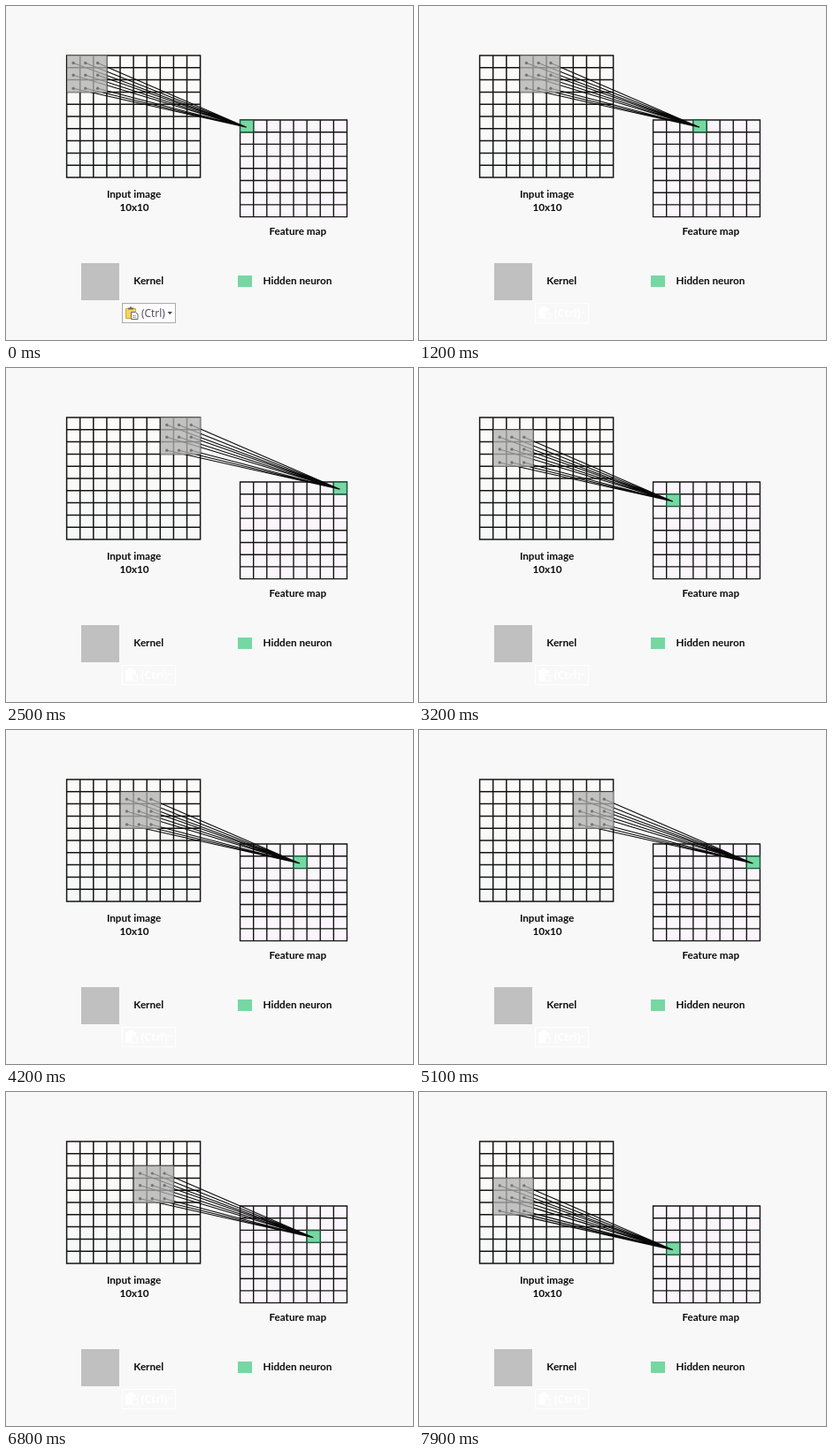
These frames come from a looping animation (460x378 px, 8000 ms). An HTML page:

```html
<!DOCTYPE html>
<html lang="en">
<head>
<meta charset="utf-8">
<title>Convolution kernel</title>
<style>
  html, body { margin: 0; width: 100%; height: 100%; overflow: hidden; background: #f8f8f8; }
  svg { display: block; width: 460px; height: 378px; }
  .label { font: 700 11.7px Lato, "Open Sans", sans-serif; fill: #0c0c0c; }
  .hint { font: 12px "Open Sans", "Noto Sans", sans-serif; fill: #51455a; }
  .ghost .hint { font-weight: 700; fill: #fff; }
</style>
</head>
<body>
<svg viewBox="0 0 460 378">
  <defs>
    <linearGradient id="paper" x1="0" y1="0" x2="0" y2="1">
      <stop offset="0" stop-color="#fdfbf9"/>
      <stop offset="1" stop-color="#f6f8f8"/>
    </linearGradient>
  </defs>
  <rect width="460" height="378" fill="#f8f8f8"/>
  <rect x="68.7" y="56" width="151" height="138" fill="url(#paper)"/>
  <rect x="264.7" y="129" width="120.6" height="110" fill="#fbf6fb"/>
  <path id="inputGrid" fill="none" stroke="#141414" stroke-width="1.5"/>
  <path id="mapGrid" fill="none" stroke="#141414" stroke-width="1.4"/>

  <rect id="neuron" width="15.1" height="13.8" fill="#76d7a3" stroke="#1c5c3d" stroke-width="1.4"/>
  <path id="rays" fill="none" stroke="#080808" stroke-width="1.1"/>
  <rect id="kernel" width="45.3" height="42.2" fill="#b0b0b0" fill-opacity=".76"/>
  <g id="dots" fill="#757575"></g>

  <g class="label" text-anchor="middle">
    <text x="144.6" y="217">Input image</text>
    <text x="145" y="232">10x10</text>
    <text x="329.8" y="259">Feature map</text>
  </g>
  <rect x="85" y="291" width="43" height="42" fill="#c0c0c0"/>
  <text class="label" x="144.3" y="315">Kernel</text>
  <rect x="262" y="305" width="16" height="13" fill="#76d7a3"/>
  <text class="label" x="290.6" y="315">Hidden neuron</text>

  <g id="button">
    <rect x="131.5" y="336.5" width="60" height="22" fill="#fdfdfd" stroke="#ababab"/>
    <path d="M135.5 342.5h11v11h-11z" fill="#f5d35e" stroke="#d9a92c"/>
    <path d="M138 343.5v-2h1.7q1.3-3 2.6 0h1.7v2z" fill="#6a6a6a"/>
    <path d="M141.5 346.5h5l2.5 2.5v5.500h-7.500z" fill="#fff" stroke="#6a6a6a"/>
    <path d="M143 350.500h4M143 352.500h4" stroke="#8a8a8a" stroke-width=".8"/>
    <text class="hint" x="153" y="352" textLength="">(Ctrl)</text>
    <path d="M182.500 346h5.500l-2.750 3.200z" fill="#51455a"/>
  </g>
  <g id="ghost" class="ghost">
    <rect x="131.5" y="336.5" width="60" height="22" fill="none" stroke="#fff"/>
    <path d="M135 342h3v-2h6v2h3v4h-5v8h-7z" fill="#fff"/>
    <path d="M142.500 347.500h6v6.500h-6z" fill="none" stroke="#fff"/>
    <text class="hint" x="152.500" y="352">(Ctrl)</text>
    <path d="M183.500 346h4l-2 2.200z" fill="#fff"/>
  </g>
</svg>
<script>
const LOOP = 8000, HINT_END = 300;
const DX = 15.1, DY = 13.8, MAP_COLS = 8;
// Start of each kernel step, in tenths of a second
const STEPS = [0, 4, 8, 12, 15, 18, 22, 25, 29, 32, 35, 38, 42, 45, 48, 51,
               54, 57, 60, 62, 65, 68, 71, 73, 76, 79];
const DOT_X = [76.1, 89.8, 103.6], DOT_Y = [64.5, 78.2, 93.2];
const SVG_NS = "http://www.w3.org/2000/svg";
const el = id => document.getElementById(id);

function setAttrs(node, attrs) {
  for (const key in attrs) node.setAttribute(key, attrs[key]);
}

function gridPath(x, y, n, dy) {
  let d = "";
  for (let i = 0; i <= n; i++) {
    d += `M${x + i * DX} ${y - .7}v${n * dy + 1.4}`;
    d += `M${x - .7} ${y + i * dy}h${n * DX + 1.4}`;
  }
  return d;
}

el("inputGrid").setAttribute("d", gridPath(68.6, 56, 10, DY));
el("mapGrid").setAttribute("d", gridPath(264.6, 129, MAP_COLS, 13.7));

const points = DOT_Y.flatMap(y => DOT_X.map(x => [x, y]));
for (const [cx, cy] of points) {
  const dot = document.createElementNS(SVG_NS, "circle");
  setAttrs(dot, { cx, cy, r: 1.7 });
  el("dots").append(dot);
}

function draw(t) {
  const step = STEPS.filter(s => s * 100 <= t).length - 1;
  const dx = step % MAP_COLS * DX, dy = Math.floor(step / MAP_COLS) * DY;
  const tip = `${271.8 + dx} ${137.2 + dy}`;

  setAttrs(el("kernel"), { x: 69 + dx, y: 55.8 + dy });
  setAttrs(el("neuron"), { x: 264.6 + dx, y: 129 + dy });
  setAttrs(el("dots"), { transform: `translate(${dx} ${dy})` });
  setAttrs(el("rays"), {
    d: points.map(([x, y]) => `M${x + dx} ${y + dy}L${tip}`).join("")
  });
  el("button").style.display = t < HINT_END ? "" : "none";
  el("ghost").style.display = t < HINT_END ? "none" : "";
}

const start = performance.now();
function tick() {
  draw((performance.now() - start) % LOOP);
  requestAnimationFrame(tick);
}
draw(0);
requestAnimationFrame(tick);
</script>
</body>
</html>
```
